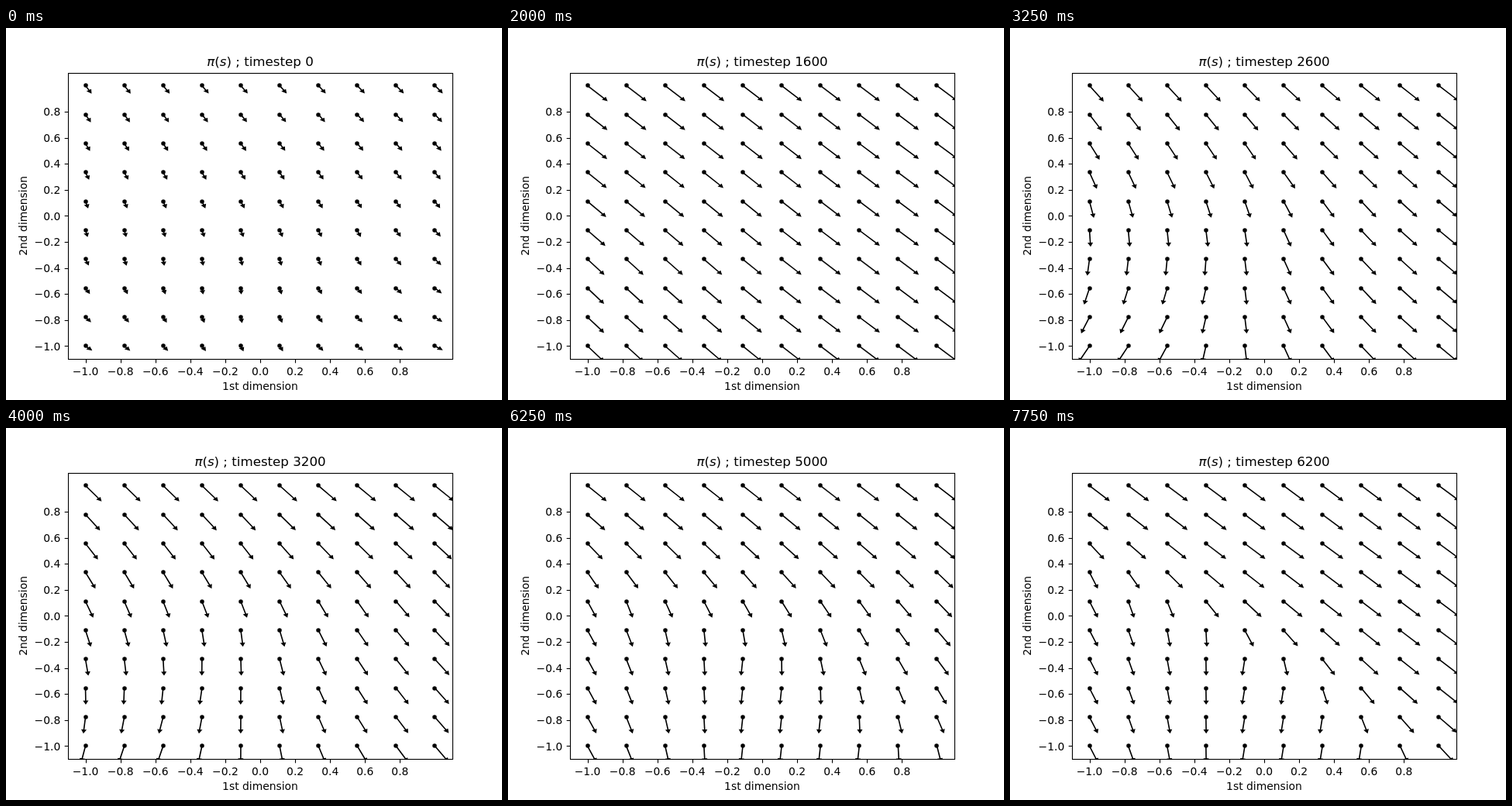
An HTML page with a canvas that plays this animation: 640 by 480 pixels, repeating every 8 s.

```html
<!DOCTYPE html>
<html>
<head>
<meta charset="utf-8">
<style>
  html, body { margin: 0; width: 100%; height: 100%; overflow: hidden; background: #fff; }
  canvas { display: block; width: 640px; height: 480px; }
</style>
</head>
<body>
<canvas id="stage" width="640" height="480"></canvas>
<script>
const ctx = document.getElementById('stage').getContext('2d');
const BOX = { x: 80, y: 57.6, w: 496, h: 369.6 };
const SX = BOX.w / 2.2, SY = BOX.h / 2.2;
const STEP_MS = 250, STEPS = 32, GRID = 10;
const HEAD = 0.02;
const FONT = '"DejaVu Sans", sans-serif';

const px = x => BOX.x + (x + 1.1) * SX;
const py = y => BOX.y + (1.1 - y) * SY;
const snap = v => Math.floor(v + 0.5) + 0.5;

// Policy snapshots. Each plane [a, b, c] means a + b * column + c * row (row 0 on top).
// Sideways action: tanh of the highest plane. Downward action: tanh of one plane.
const policies = [
  { at: 0, down: [0.39, 0, -0.026],
    side: [[0.22, 0.008, -0.035], [-0.09, -0.03, 0.03], [-0.23, 0.038, 0.013]] },
  { at: 4, down: [2.5, 0.17, -0.2],
    side: [[1.45, 0.01, -0.16], [-0.7, 0.25, 0]] },
  { at: 8, down: [2.6, 0, 0],
    side: [[2, 0.03, -0.15], [1.05, 0.08, 0], [0.4, 0.28, 0]] },
  { at: 13, down: [2.6, 0, 0],
    side: [[0.8, 0.015, -0.15], [-0.95, 0.26, 0], [0.1, 0.2, -0.17]] },
  { at: 20, down: [2.6, 0, 0],
    side: [[1.5, -0.03, -0.26], [1, -0.15, -0.08], [-0.3, 0.1, -0.04], [-0.15, 0, 0]] },
  { at: 25, down: [2.6, 0, 0],
    side: [[1.53, 0.05, -0.32], [0.43, -0.13, 0], [0.1, 0.15, -0.14], [-0.08, 0, 0]] },
  { at: 31, down: [2.6, 0, 0],
    side: [[2.15, 0.38, -0.65], [0.4, -0.13, 0], [0.3, 0.48, -0.42], [-0.12, 0, 0]] }
];

const plane = ([a, b, c], col, row) => a + b * col + c * row;
const mix = (a, b, k) => a + (b - a) * k;

function action(policy, col, row) {
  return {
    x: Math.tanh(Math.max(...policy.side.map(p => plane(p, col, row)))),
    y: -Math.tanh(plane(policy.down, col, row))
  };
}

function arrow(x, y, dx, dy) {
  const len = Math.hypot(dx, dy), ux = dx / len, uy = dy / len;
  const outline = [
    [len + HEAD, 0], [len, HEAD / 2], [len, 0.0005], [0, 0.0005],
    [0, -0.0005], [len, -0.0005], [len, -HEAD / 2]
  ];
  ctx.beginPath();
  for (const [along, side] of outline)
    ctx.lineTo(px(x + along * ux - side * uy), py(y + along * uy + side * ux));
  ctx.closePath();
  ctx.fill();
  ctx.stroke();
}

function dot(x, y) {
  ctx.beginPath();
  ctx.arc(Math.round(px(x)), Math.round(py(y)), 2.78, 0, 2 * Math.PI);
  ctx.fill();
}

function line(x1, y1, x2, y2) {
  ctx.beginPath();
  ctx.moveTo(x1, y1);
  ctx.lineTo(x2, y2);
  ctx.stroke();
}

function drawField(step) {
  let next = policies.findIndex(p => p.at > step);
  if (next < 0) next = policies.length - 1;
  const from = policies[next - 1], to = policies[next];
  const t = (step - from.at) / (to.at - from.at);
  const k = t * t * (3 - 2 * t);

  ctx.save();
  ctx.beginPath();
  ctx.rect(BOX.x, BOX.y, BOX.w, BOX.h);
  ctx.clip();
  ctx.lineWidth = 1.39;
  for (let row = 0; row < GRID; row++) {
    for (let col = 0; col < GRID; col++) {
      const x = -1 + 2 * col / (GRID - 1), y = 1 - 2 * row / (GRID - 1);
      const a = action(from, col, row), b = action(to, col, row);
      arrow(x, y, 0.1 * mix(a.x, b.x, k), 0.1 * mix(a.y, b.y, k));
      dot(x, y);
    }
  }
  ctx.restore();
}

function drawAxes() {
  const left = snap(BOX.x), right = snap(BOX.x + BOX.w);
  const top = snap(BOX.y), bottom = snap(BOX.y + BOX.h);
  ctx.lineWidth = 1.11;
  ctx.strokeRect(left, top, right - left, bottom - top);
  ctx.font = '13.89px ' + FONT;
  for (let i = 0; i < GRID; i++) {
    const v = (i - 5) / 5;
    const label = (v < 0 ? '\u2212' : '') + Math.abs(v).toFixed(1);
    const x = snap(px(v)), y = snap(py(v));
    line(x, bottom, x, bottom + 4.86);
    line(left, y, left - 4.86, y);
    ctx.textAlign = 'center';
    ctx.fillText(label, px(v), 448);
    ctx.textAlign = 'right';
    ctx.fillText(label, 70.3, py(v) + 5.2);
  }
  ctx.textAlign = 'center';
  ctx.fillText('1st dimension', 328, 467);
  ctx.save();
  ctx.translate(27, 242.4);
  ctx.rotate(-Math.PI / 2);
  ctx.fillText('2nd dimension', 0, 0);
  ctx.restore();
}

function drawTitle(step) {
  const upright = '16.67px ' + FONT, italic = 'italic ' + upright;
  const parts = [
    [italic, '\u03c0'], [upright, '('], [italic, 's'], [upright, ')'],
    [upright, ' ; timestep ' + step * 200]
  ];
  const widths = parts.map(([font, text]) => {
    ctx.font = font;
    return ctx.measureText(text).width;
  });
  let x = 328 - widths.reduce((sum, w) => sum + w, 0) / 2;
  ctx.textAlign = 'left';
  parts.forEach(([font, text], i) => {
    ctx.font = font;
    ctx.fillText(text, x, 49.3);
    x += widths[i];
  });
}

function render(now) {
  const step = Math.floor(now / STEP_MS) % STEPS;
  ctx.fillStyle = '#fff';
  ctx.fillRect(0, 0, 640, 480);
  ctx.fillStyle = ctx.strokeStyle = '#000';
  drawField(step);
  drawAxes();
  drawTitle(step);
}

const start = performance.now();
function tick() {
  render(performance.now() - start);
  requestAnimationFrame(tick);
}
tick();
</script>
</body>
</html>
```
